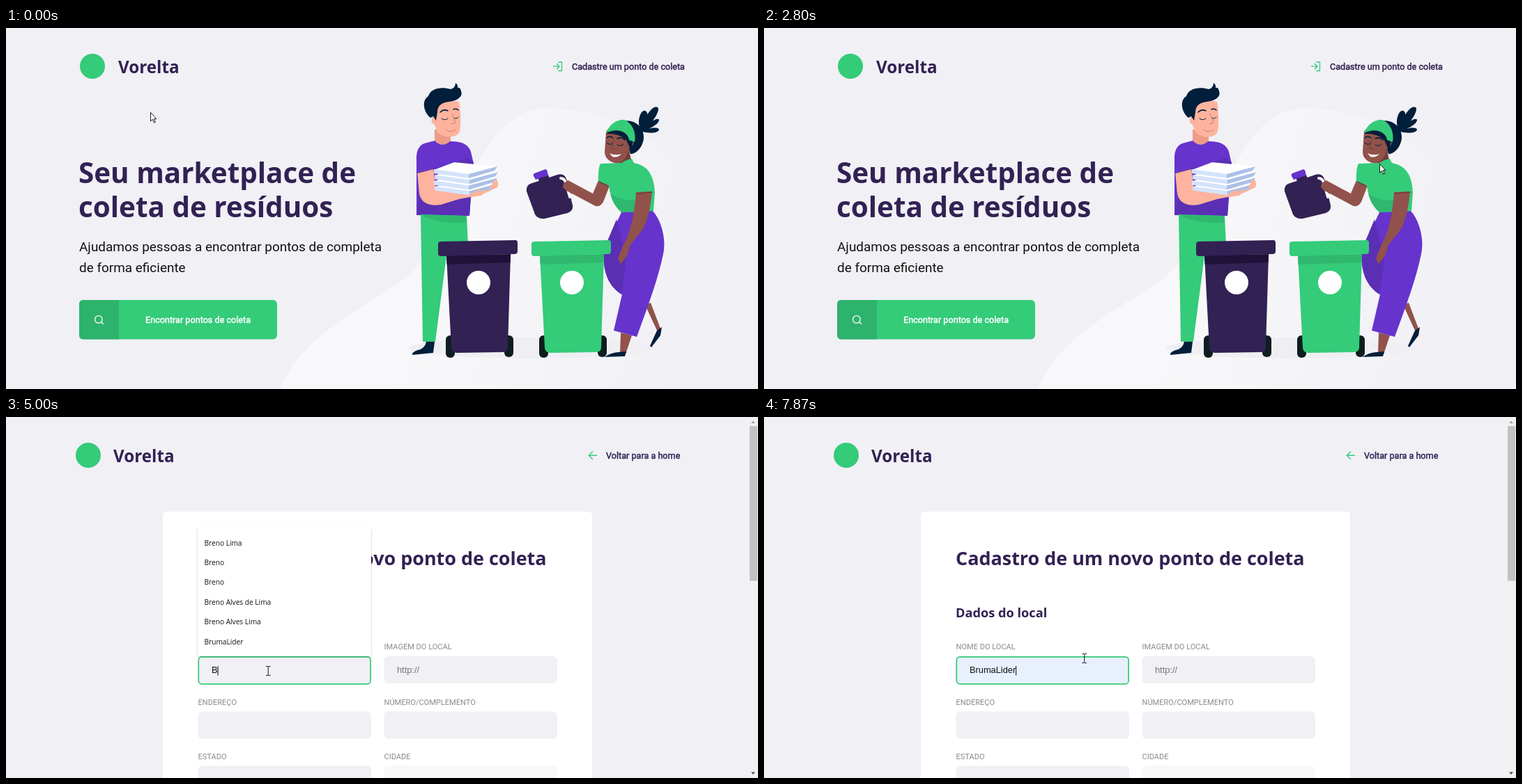
An HTML page for the animation above (8000 ms loop, 1079x519 px).

```html
<!DOCTYPE html>
<html lang="pt-BR">
<head>
<meta charset="utf-8">
<title>Ponto de coleta</title>
<style>
  html, body { margin: 0; width: 100%; height: 100%; overflow: hidden; background: #f0f0f5; }
  svg { display: block; width: 100%; height: 100%; font-family: Roboto, sans-serif; }
  .title { font-family: "Open Sans", "Noto Sans", sans-serif; font-weight: 700; fill: #322153; }
  .strong { font-size: 12.64px; fill: #322153; stroke: #322153; stroke-width: .45px; }
  .label { font-size: 11.06px; fill: #8a8a8a; }
  .typed { font-family: "Liberation Sans", Arial, sans-serif; font-size: 12.8px; }
  .option { font-family: "Open Sans", "Noto Sans", sans-serif; font-size: 10.15px; fill: #111; }
  .line { fill: none; stroke-linecap: round; stroke-linejoin: round; }
  .navy { fill: #011e3a; }
  .skin { fill: #fdb39d; }
  .brown { fill: #91524b; }
  .purple { fill: #6633cc; }
  .purpleShade { fill: #5a2fb4; }
  .green { fill: #34cb79; }
  .greenShade { fill: #2fb86e; }
  .plum { fill: #322153; }
</style>
</head>
<body>
<svg viewBox="0 0 1079 519">
  <defs>
    <linearGradient id="fade" gradientUnits="userSpaceOnUse" x1="620" y1="280" x2="1030" y2="390">
      <stop offset="0" stop-color="#f8f8fa"/><stop offset="1" stop-color="#f0f0f5"/>
    </linearGradient>
    <filter id="shadow" x="-5%" y="-5%" width="110%" height="112%">
      <feDropShadow dx="0" dy="1" stdDeviation="1.2" flood-opacity=".3"/>
    </filter>
    <g id="wheels" fill="#0d1d20">
      <rect x="631" y="442" width="13" height="32" rx="6"/>
      <rect x="715" y="442" width="13" height="31" rx="6"/>
    </g>
    <path id="binBody" d="M632 327L724 326L720 459Q720 466 713 466L647 467Q640 467 639 460Z"/>
    <path id="binShade" d="M632 327L724 325L723.6 337L632.6 340Z"/>
    <path id="binLid" d="M624 307L731 305Q734 305 734 309V321Q734 325 730 325L624 328Q620 328 620 324V311Q620 307 624 307Z"/>
  </defs>
  <rect width="1079" height="519" fill="#f0f0f5"/>

  <g id="home">
    <path fill="url(#fade)" d="M393 519C425 432 545 390 583 350C665 275 672 118 778 115C870 118 935 155 975 205C1010 250 1048 290 1054 335C1060 400 1040 470 1030 519Z"/>
    <ellipse cx="757" cy="460" rx="180" ry="15" fill="#efeff3"/>

    <circle cx="124" cy="55" r="18" class="green"/>
    <text x="161" y="64.5" class="title" font-size="24.2">Vorelta</text>
    <path class="line" stroke="#34cb79" stroke-width="1.3" d="M793 49H797.5V61.5H793M785.5 55.2H794M790.5 51.5L794 55.2L790.5 59"/>
    <text x="812" y="59.6" class="strong">Cadastre um ponto de coleta</text>
    <g class="title" font-size="40.4">
      <text x="104" y="223">Seu marketplace de</text>
      <text x="104" y="272">coleta de resíduos</text>
    </g>
    <g font-size="18.96" fill="#111">
      <text x="105" y="321">Ajudamos pessoas a encontrar pontos de completa</text>
      <text x="105" y="350.5">de forma eficiente</text>
    </g>
    <rect x="105" y="391" width="284" height="56.5" rx="6" class="green"/>
    <path fill="#2eb36c" d="M162 391H111Q105 391 105 397V441.5Q105 447.5 111 447.5H162Z"/>
    <path class="line" stroke="#fff" stroke-width="1.3" d="M139.5 425.5L136.8 422.8M127.5 419a5.3 5.3 0 1 0 10.6 0a5.3 5.3 0 1 0-10.6 0"/>
    <text x="200" y="423.7" class="strong" style="fill:#fff;stroke:#fff">Encontrar pontos de coleta</text>

    <!-- man -->
    <path fill="#ee9c88" d="M615 146H638V169Q627 176 615 168Z"/>
    <path class="skin" d="M617 116C621 106 640 103 650 106C653 123 653 144 650 151C643 159 627 158 619 150L615 139Q608 136 612 128L617 129Z"/>
    <path class="navy" d="M609 129C599 121 596 104 606 98C609 87 624 84 638 88Q645 86 645 79Q649 82 648 86Q652 85 653 91C656 98 648 105 635 106Q619 108 619 121L617 133L613 127Z"/>
    <g class="line" stroke="#011e3a" stroke-width="1.5">
      <path d="M623 121Q628 116 634 119M642 117Q646 115 649 118"/>
      <path stroke-width="1" d="M625 130Q629 134 634 130M642 129Q646 132 649 128"/>
      <path stroke="#d97c6c" stroke-width="1" d="M640 123Q645 133 644 137L639 138M631 146Q638 152 645 146"/>
    </g>
    <path class="purple" d="M589 190Q588 171 600 166L615 162Q626 173 637 163Q662 162 667 178L671 195L665 270L589 269Z"/>
    <path class="purpleShade" d="M643 193L662 187L671 193L667 214L616 210ZM592 246L667 238L665 270L589 269Z"/>
    <path class="green" d="M595 268L661 270L663 312L633 320L616 451H598Z"/>
    <path class="greenShade" d="M598 269L660 270L661 279Q625 283 598 270Z"/>
    <path class="navy" d="M603 451H615L613 467L583 470Q582 466 591 463Q601 461 603 451Z"/>
    <path class="skin" d="M590 207L613 201L617 234L664 229L685 230Q697 226 703 217Q708 222 705 229L682 240L650 246L624 254Q597 258 593 238Z"/>
    <g id="papers"></g>
    <path class="skin" d="M664 240L681 230L677 237L690 231L682 241L668 243Z"/>
    <path class="skin" d="M693 230Q698 226 700 218L704 220Q709 224 703 230Z"/>
    <path class="line" stroke="#5a2fb4" stroke-width="2" d="M590 208L613 202"/>

    <!-- woman -->
    <g class="navy">
      <path d="M913 149C903 139 910 117 917 119C924 121 919 138 913 149C911 137 926 109 935 114C940 119 925 140 913 149C922 134 938 127 937 133C935 140 922 145 913 149C926 141 941 143 936 148C931 152 921 151 913 149Z"/>
      <path d="M875 137C899 126 916 142 915 158C914 172 903 182 896 181L887 155Z"/>
    </g>
    <path class="brown" d="M861 149C868 138 890 140 895 160Q902 159 900 168L894 174L898 195Q889 202 881 195C868 195 859 188 859 178Z"/>
    <path fill="#6f3c3a" d="M893 175Q892 188 880 194L888 197L896 190Z"/>
    <path class="navy" d="M861 152Q870 142 887 150L900 160L897 177L890 161Q880 151 861 152Z"/>
    <path class="green" d="M861 151C866 137 878 131 887 132C898 136 905 150 902 164L894 161C893 151 880 142 861 151Z"/>
    <g class="line" stroke="#011e3a" stroke-width="1.5">
      <path d="M862 158Q866 154 871 158M877 159Q884 156 888 161"/>
      <path stroke-width="1" d="M862 165Q866 169 870 166M877 168Q882 171 886 167"/>
      <path stroke="#6f3c3a" stroke-width="1" d="M872 161L869 173L874 174"/>
    </g>
    <path fill="#fff" d="M866 180Q874 184 883 181Q878 187 870 185Z"/>

    <path class="brown" d="M917 398L925 395L939 432L935 437ZM882 438L898 442L889 469L881 468Z"/>
    <path class="navy" d="M934 435L941 430L939 442L926 459L924 457ZM859 473Q867 467 879 466L890 465L888 472Z"/>
    <path class="purple" d="M884 263L926 261C940 274 948 304 943 325C936 359 922 398 905 444L872 435L884 383C866 372 855 352 858 318Z"/>
    <path class="purpleShade" d="M876 275C880 290 884 312 890 325C889 350 885 370 883 383C866 372 855 352 858 318Z"/>
    <path class="brown" d="M850 219L866 227L857 250Q851 260 842 254L814 239L803 235Q798 229 799 222L805 219L814 223L842 238Z"/>
    <path class="green" d="M853 195L883 194Q890 189 898 188L901 194C924 198 930 216 931 237L929 263L883 265Q867 248 865 226L850 222Q849 203 853 195Z"/>
    <path class="greenShade" d="M867 238Q885 251 905 247L905 262L883 265Q871 255 867 238Z"/>
    <path class="brown" d="M904 236L927 235Q924 270 914 289L895 313Q894 326 882 339L878 331L885 314Q901 285 904 236Z"/>
    <path class="line" stroke="#6f3c3a" stroke-width="1.5" d="M905 238L927 236M851 221L864 227"/>

    <!-- jug -->
    <path class="plum" d="M763 215L778 211L781 220L767 226Z"/>
    <path class="purple" d="M758 209L774 203Q777 204 777 208L778 212L760 218L757 213Q756 210 758 209Z"/>
    <path class="plum" d="M752 224L791 211Q801 208 804 217L813 255Q814 263 806 266L773 274Q763 275 759 268L747 235Q746 227 752 224Z"/>
    <path class="line" stroke="#f7f7f9" stroke-width="4" d="M796 216Q801 216 803 222L809 243"/>
    <path class="brown" d="M800 223L807 219L818 226L815 239L804 234L799 229Z"/>

    <!-- bins -->
    <use href="#wheels"/><use href="#wheels" x="134"/>
    <use href="#binBody" class="plum"/><use href="#binShade" fill="#1f1239"/><use href="#binLid" class="plum"/>
    <use href="#binBody" x="134" class="green"/><use href="#binShade" x="134" class="greenShade"/><use href="#binLid" x="134" class="green"/>
    <g fill="#fff"><circle cx="678" cy="366" r="17"/><circle cx="812" cy="366" r="17"/></g>
    <path class="brown" d="M882 322L894 314Q894 326 882 339L878 331Z"/>

    <g id="status">
      <path fill="#dee1e6" d="M0 502.5H96Q99 502.5 99 506V519H0Z"/>
      <text x="4" y="513.7" font-size="8.8" fill="#4a4d51">localhost:3000/create</text>
    </g>
  </g>

  <g id="form">
    <circle cx="118" cy="55" r="18" class="green"/>
    <text x="154" y="64.5" class="title" font-size="24.2">Vorelta</text>
    <path id="back" class="line" stroke="#34cb79" stroke-width="1.4" d="M847.5 55.3H836.5M841.5 50L836.2 55.3L841.5 60.6"/>
    <text x="861" y="60" class="strong">Voltar para a home</text>
    <path fill="#fff" d="M225 519V142Q225 136 231 136H835Q841 136 841 142V519Z"/>
    <text x="275" y="213" class="title" font-size="26.95">Cadastro de um novo ponto de coleta</text>
    <text x="275" y="287.5" class="title" font-size="18.2">Dados do local</text>
    <g id="firstRow"></g>
    <g id="lowerRows"></g>
    <text x="561" y="367.5" class="typed" fill="#757575">http://</text>
    <rect id="focus" x="276.3" y="344.8" width="246.8" height="39" rx="4.5" stroke="#34cb79" stroke-width="1.7"/>
    <text id="value" x="295" y="368" class="typed" fill="#111"></text>
    <path id="caret" stroke="#000" d="M0 358V371.5"/>
    <g id="menu"></g>
    <rect x="1065" width="14" height="519" fill="#f1f1f1"/>
    <rect x="1067" y="13" width="11" height="222.5" fill="#c1c1c1"/>
    <path fill="#a3a3a3" d="M1069 9L1072 5.5L1075 9Z"/>
    <path fill="#505050" d="M1069 510.5H1075L1072 514Z"/>
  </g>

  <g id="pointer" fill="#fff" stroke="#000" stroke-width=".9" stroke-linejoin="round">
    <path id="arrow" d="M.5 .5V13L3.4 10.3L5.5 15.2L7.4 14.4L5.3 9.7H9Z"/>
    <path id="hand" d="M4.5 11V2Q4.5 .5 6 .5Q7.3 .5 7.3 2V6.5Q9.3 5.5 9.6 7.3Q11.5 6.5 11.7 8.3Q13.5 8 13.5 9.8V13L12 18.5H5.5L1 12.5Q.3 10.5 2.3 10.3ZM7.3 6.5V9.5M9.6 7.3V10M11.7 8.3V10.5"/>
    <path id="beam" fill="none" d="M0 .5H2.5L3.2 1.2L4 .5H6.5M3.2 1V13M0 13.5H2.5L3.2 12.8L4 13.5H6.5"/>
  </g>
</svg>

<script>
const LOOP = 8000, TICK = 1000 / 15;
const el = id => document.getElementById(id);
const show = (id, on) => { el(id).style.display = on ? '' : 'none'; };

// Last value whose start time has passed.
const at = (t, steps) => steps.reduce((value, [start, next]) => t >= start ? next : value, steps[0][1]);

const field = (x, y, label, fill = '#f0f0f5') =>
  `<text x="${x}" y="${y - 10}" class="label">${label}</text>
   <rect x="${x}" y="${y}" width="248.5" height="39" rx="6" fill="${fill}"/>`;

el('firstRow').innerHTML = field(275.5, 344, 'NOME DO LOCAL') + field(542.5, 344, 'IMAGEM DO LOCAL');
el('lowerRows').innerHTML =
  field(275.5, 422, 'ENDEREÇO') + field(542.5, 422, 'NÚMERO/COMPLEMENTO') +
  field(275.5, 500, 'ESTADO') + field(542.5, 500, 'CIDADE', '#f8f8f9');

el('papers').innerHTML = [3, 2, 1, 0].map(i => `<g transform="translate(${i % 2} ${i * 8.2})">
  <path fill="#fff" d="M614 204L643 193L705 199L664 210Z"/>
  <path fill="#d4e3fb" d="M614 203L664 210V216L614 209Z"/>
  <path fill="#aac0e8" d="M664 210L705 199L701 205L664 216Z"/></g>`).join('');

const LISTS = {
  all: ['Breno Lima', 'Otávio Mello', 'a', 'Rogério', 'Teste', 'Breno'],
  matches: ['Breno Lima', 'Breno', 'Breno', 'Breno Alves de Lima', 'Breno Alves Lima', 'BrumaLider'],
  four: ['BrumaLider', 'BrumaLider Sul', 'BrumaLider Norte', 'Bruno'],
  three: ['BrumaLider', 'BrumaLider Sul', 'BrumaLider Norte'],
};
const MENU = [[0, 'all'], [5000, 'matches'], [6000, 'four'], [6200, 'three']];
const MENU_OPACITY = [[0, 0], [4000, .5], [4070, 1], [5330, 0], [5670, .5], [5730, 1],
  [7200, .6], [7270, .3], [7330, 0]];
const VALUE = [[0, ''], [4930, 'B'], [5330, 'Br'], [6000, 'Bru'], [6200, 'Brum'], [6400, 'Bruma'], [7000, 'BrumaLider']];
const CARET = [[0, false], [3670, true], [4530, false], [4930, true], [5870, false], [6000, true]];

// Gliding part of the pointer's path, then its jumps.
const GLIDE = [[200, 207, 121], [800, 704, 329], [930, 681, 323], [1000, 681, 323], [1730, 879, 60]];
const JUMPS = [[0, [879, 60]], [2470, [899, 96]], [2670, [892, 150]], [2800, [883, 195]], [3070, [725, 307]],
  [3330, [421, 341]], [3530, [373, 358]], [7800, [418, 349]], [7870, [456.5, 340]]];

function pointerAt(t) {
  if (t >= 1730) return at(t, JUMPS);
  const i = GLIDE.findIndex(([time]) => t < time);
  if (i <= 0) return GLIDE[0].slice(1);
  const [t0, x0, y0] = GLIDE[i - 1], [t1, x1, y1] = GLIDE[i];
  const u = (t - t0) / (t1 - t0), k = u * u * (3 - 2 * u);
  return [x0 + (x1 - x0) * k, y0 + (y1 - y0) * k];
}

function drawMenu(t) {
  const items = LISTS[at(t, MENU)];
  const height = items.length * 28.45 + 12.5;
  const top = t < 6000 ? 160 : 386;
  const highlight = t >= 7000 ? `<rect x="275" y="${top + 6}" width="249" height="28.45" fill="#e9e9ec"/>` : '';
  const rows = items.map((item, i) => `<text x="284.5" y="${top + 24.5 + i * 28.45}" class="option">${item}</text>`);
  el('menu').innerHTML =
    `<rect x="275" y="${top}" width="249" height="${height}" rx="1.5" fill="#fff" filter="url(#shadow)"/>` + highlight + rows.join('');
  el('menu').style.opacity = at(t, MENU_OPACITY);
}

function draw(t) {
  const onForm = t >= 3070;
  show('home', !onForm);
  show('form', onForm);
  show('status', t >= 1870 && t < 2670);
  el('status').style.opacity = t < 2000 ? .6 : 1;

  if (onForm) {
    show('back', t >= 3330);
    el('lowerRows').setAttribute('transform', `translate(0 ${t >= 3530 ? 1.6 : 0})`);
    show('focus', t >= 3670);
    el('focus').setAttribute('fill', t >= 7000 ? '#e8f0fe' : '#f0f0f5');
    el('value').textContent = at(t, VALUE);
    show('caret', at(t, CARET));
    el('caret').setAttribute('transform', `translate(${295.5 + el('value').getComputedTextLength()} 0)`);
    drawMenu(t);
  }

  const kind = at(t, [[0, 'arrow'], [1730, 'hand'], [2470, 'arrow'], [3530, 'beam']]);
  for (const id of ['arrow', 'hand', 'beam']) show(id, id === kind);
  const [x, y] = pointerAt(t < 1730 ? Math.floor(t / TICK + .01) * TICK : t);
  el('pointer').setAttribute('transform', `translate(${x} ${y})`);
}

const start = performance.now();
function frame() {
  draw((performance.now() - start) % LOOP);
  requestAnimationFrame(frame);
}
frame();
</script>
</body>
</html>
```
